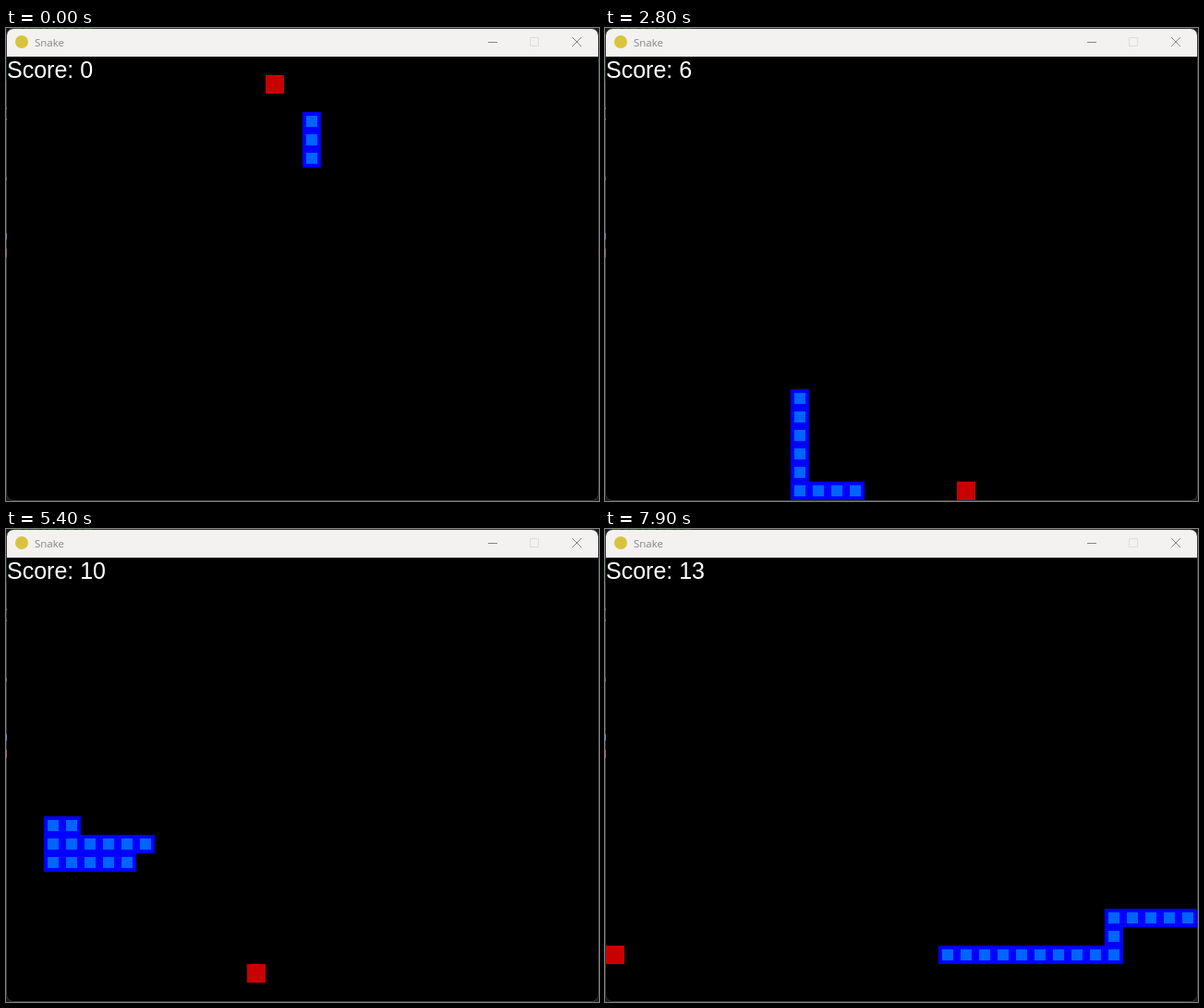
An HTML page with a canvas that plays this animation: 642x512 px, repeating every 8000 ms.

```html
<!DOCTYPE html>
<html lang="en">
<head>
<meta charset="utf-8">
<title>Snake</title>
<style>
  html, body { margin: 0; width: 100%; height: 100%; overflow: hidden; background: #1c1c1c; }
  .window {
    position: absolute; left: 0; top: 0; width: 640px; height: 510px;
    border: 1px solid #383838; border-radius: 8px; overflow: hidden; background: #000;
  }
  .bar { position: absolute; left: 0; top: 0; width: 640px; height: 30px; background: #f3f2f1; }
  .bar svg { position: absolute; left: 0; top: 0; }
  .name { font: 11.5px "Open Sans", "Noto Sans", sans-serif; fill: #858585; }
  canvas { position: absolute; left: 0; top: 30px; }
  .score {
    position: absolute; left: 0; top: 30px; white-space: pre;
    font: 25px/29px "Liberation Sans", Arial, sans-serif; color: #fff;
  }
  .edge { position: absolute; left: 0; top: 0; }
</style>
</head>
<body>
<div class="window">
  <div class="bar">
    <svg width="640" height="30" fill="none">
      <circle cx="16" cy="14" r="7" fill="#d8c43c"/>
      <text class="name" x="30" y="19">Snake</text>
      <path d="M521 14.5h10" stroke="#858585"/>
      <path d="M566.5 9.5h9v9h-9z" stroke="#dcdcdc"/>
      <path d="M612 9l10 10M622 9l-10 10" stroke="#858585"/>
    </svg>
  </div>
  <canvas width="640" height="480"></canvas>
  <div class="score">Score: 0</div>
</div>
<svg class="edge" width="100" height="260" fill="none">
  <path d="M8 .5H94" stroke="#3c5c36" stroke-dasharray="9 3 5 2"/>
  <path d="M.5 32V58" stroke="#12361f"/>
  <path d="M.5 222v7" stroke="#5687b5"/>
  <path d="M.5 239v9" stroke="#a0603c"/>
  <path d="M.5 86v2m0 10v2m0 61v4" stroke="#666"/>
</svg>
<script>
const CELL = 20, FRAME_MS = 100, FRAMES = 80;
const ctx = document.querySelector('canvas').getContext('2d');
const scoreLabel = document.querySelector('.score');

const route = 'U4 L2 D6 L5 D5 L7 D5 L1 U16 R1 D13 R8 D9 R19 U15 R2 D4 L1 D4 L28 U2 R1 D1 R4 ' +
  'D7 R6 D1 R10 U7 R1 D3 R4 D1 L4 D2 R5 U1 R1 D1 R1 U3 L4 D2 L9';
const foods = [[14, 1], [9, 7], [2, 12], [1, 17], [1, 1], [10, 14], [19, 23], [29, 15],
  [22, 16], [2, 14], [13, 22], [17, 23], [23, 16], [0, 21]];

// Frames on which the picture stalls, and [tick, moves made] pairs between them.
const stalls = [13, 25, 37, 49, 61, 72];
const pace = [[0, 0], [9, 27], [12, 37], [23, 73], [26, 83], [34, 109], [41, 131], [43, 138],
  [45, 145], [50, 161], [54, 174], [57, 183], [65, 210], [66, 213], [73, 234]];

const START_LENGTH = 3;
const steps = { U: [0, -1], D: [0, 1], L: [-1, 0], R: [1, 0] };
const path = [[16, 5]];
for (const leg of route.split(' ')) {
  const [dx, dy] = steps[leg[0]];
  for (let i = +leg.slice(1); i > 0; i--) {
    const [x, y] = path[path.length - 1];
    path.push([x + dx, y + dy]);
  }
}

// Score once the head has reached each cell of the path.
let eaten = 0;
const scores = path.map(([x, y]) => {
  const [fx, fy] = foods[eaten];
  return x === fx && y === fy ? ++eaten : eaten;
});

function movesAt(frame) {
  const tick = frame - stalls.filter(s => s <= frame).length;
  const i = Math.max(1, pace.findIndex(([t]) => t >= tick));
  const [t0, m0] = pace[i - 1], [t1, m1] = pace[i];
  return Math.round(m0 + (m1 - m0) * (tick - t0) / (t1 - t0));
}

function square([x, y], color, inset = 0) {
  ctx.fillStyle = color;
  ctx.fillRect(x * CELL + inset, y * CELL + inset, CELL - 2 * inset, CELL - 2 * inset);
}

function draw(frame) {
  const head = movesAt(frame) + START_LENGTH - 1;
  const score = scores[head];
  ctx.clearRect(0, 0, 640, 480);
  for (const cell of path.slice(head + 1 - START_LENGTH - score, head + 1)) {
    square(cell, '#00f');
    square(cell, '#0064ff', 4);
  }
  square(foods[score], '#c80000');
  scoreLabel.textContent = 'Score: ' + score;
}

const start = performance.now();
let shown = -1;
function tick() {
  const frame = Math.floor((performance.now() - start) / FRAME_MS) % FRAMES;
  if (frame !== shown) draw(shown = frame);
  requestAnimationFrame(tick);
}
tick();
</script>
</body>
</html>
```
